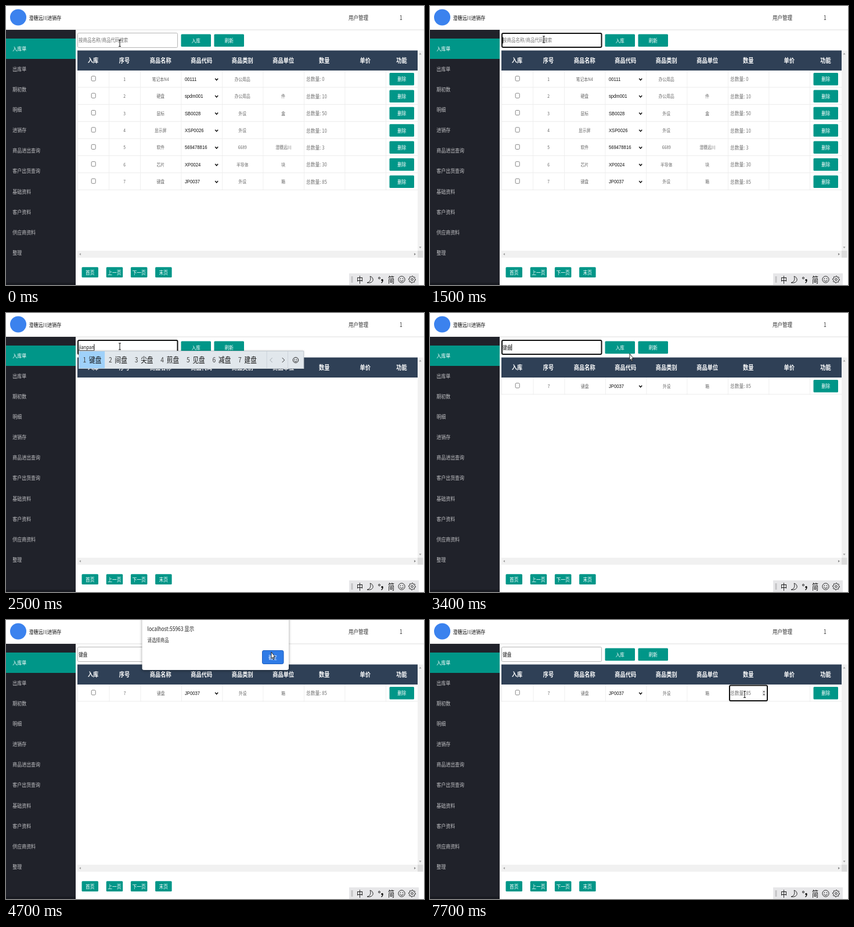
Recreate the animation shown at these times as an HTML page with a canvas. Size 720 by 480 pixels, loop 8 s.

```html
<!DOCTYPE html>
<html lang="zh-CN">
<head>
<meta charset="utf-8">
<title>入库单</title>
<style>
html, body { margin: 0; width: 100%; height: 100%; overflow: hidden; background: #fff; }
canvas { display: block; }
</style>
</head>
<body>
<canvas id="stage" width="720" height="480"></canvas>
<script>
const ctx = document.getElementById('stage').getContext('2d');
const LOOP = 8000, STEP = 100;
const ASPECT = 0.844;
const CJK = '"Noto Sans CJK SC", "Noto Sans CJK", sans-serif';
const ARIAL = '"Liberation Sans", sans-serif';
const TEAL = '#009688', NAVY = '#2f4056', GREY = '#757575';

const MENU = ['入库单', '出库单', '期初数', '明细', '进销存', '商品进出查询',
  '客户出货查询', '基础资料', '客户资料', '供应商资料', '整理'];
const EDGES = [123, 177, 231, 301.5, 372, 442.5, 513, 583.5, 654, 709];
const HEADS = ['入库', '序号', '商品名称', '商品代码', '商品类别', '商品单位', '数量', '单价', '功能'];
const ROWS = [
  ['笔记本N4', '00111', '办公用品', '', 0],
  ['硬盘', 'spdm001', '办公用品', '件', 10],
  ['鼠标', 'SB0028', '外设', '盒', 50],
  ['显示屏', 'XSP0026', '外设', '', 10],
  ['软件', '569478816', '6689', '澄穗远川', 3],
  ['芯片', 'XP0024', '半导体', '块', 30],
  ['键盘', 'JP0037', '外设', '箱', 85],
];
const ROW_H = 29.4;

// Typing in the input method: start time, letters, candidates, settings hint
const TYPING = [
  [1700, 'j', ['就', '几', '及', '家', '将', '叫', '进'], true],
  [1800, 'ji', ['几', '及', '级', '即', '记', '机', '集'], true],
  [2000, 'jian', ['减', '见', '间', '键', '', '吉安', '检'], true],
  [2100, 'jianp', ['键盘', '简谱', '减配', '肩膀', '尖皮', '建平', '检票'], true],
  [2200, 'jianpan', ['键盘', '间盘', '尖盘', '煎盘', '见盘', '减盘', '建盘'], false],
];
const COMMIT = 2700, BLUR = 3800, ALERT = 3900, CLOSE = 4900, QTY_FOCUS = 5600;

// Pointer path: time, x, y
const PATH = [
  [0, 196, 64], [300, 196, 64], [1200, 196, 57.5], [2900, 196, 57.5],
  [3400, 344, 70], [3800, 329, 60], [3900, 335, 58], [4200, 430, 70],
  [4300, 430, 70], [4500, 457, 55], [4800, 457, 55], [5500, 541, 128],
  [5900, 541, 128], [6000, 460, 127], [6400, 542, 128], [LOOP, 542, 128],
];

function rect(x, y, w, h, fill) {
  ctx.fillStyle = fill;
  ctx.fillRect(x, y, w, h);
}

function box(x, y, w, h, r, fill, stroke, width = 1) {
  ctx.beginPath();
  ctx.roundRect(x, y, w, h, r);
  if (fill) { ctx.fillStyle = fill; ctx.fill(); }
  if (stroke) { ctx.strokeStyle = stroke; ctx.lineWidth = width; ctx.stroke(); }
}

function line(points, color, width = 1) {
  ctx.beginPath();
  points.forEach(([x, y]) => ctx.lineTo(x, y));
  ctx.strokeStyle = color;
  ctx.lineWidth = width;
  ctx.stroke();
}

function shape(points, fill, stroke) {
  ctx.beginPath();
  points.forEach(([x, y]) => ctx.lineTo(x, y));
  ctx.closePath();
  ctx.fillStyle = fill;
  ctx.fill();
  if (stroke) { ctx.strokeStyle = stroke; ctx.lineWidth = 0.9; ctx.stroke(); }
}

function circle(x, y, r, fill, stroke) {
  ctx.beginPath();
  ctx.arc(x, y, r, 0, Math.PI * 2);
  if (fill) { ctx.fillStyle = fill; ctx.fill(); }
  if (stroke) { ctx.strokeStyle = stroke; ctx.lineWidth = 1; ctx.stroke(); }
}

// Draws one line of text centred vertically on y and returns its width.
function text(str, x, y, size, color, { align = 'left', weight = 400, font = CJK } = {}) {
  ctx.save();
  ctx.translate(x, y);
  ctx.scale(ASPECT, 1);
  ctx.font = `${weight} ${size}px ${font}`;
  ctx.textAlign = align;
  ctx.textBaseline = 'middle';
  ctx.fillStyle = color;
  ctx.fillText(str, 0, 0);
  const width = ctx.measureText(str).width * ASPECT;
  ctx.restore();
  return width;
}

const centred = (str, x, y, size, color, weight) =>
  text(str, x, y, size, color, { align: 'center', weight });

function button(label, x, y, w, h, size = 8.9, weight = 400) {
  box(x, y, w, h, 1.5, TEAL);
  centred(label, x + w / 2, y + h / 2 + 0.3, size, '#fff', weight);
}

function triangle(x, y, dx, dy, color, r = 2) {
  shape([[x + dx * r, y + dy * r], [x - dx + dy * r, y - dy + dx * r],
    [x - dx - dy * r, y - dy - dx * r]], color);
}

function smile(x, y, r) {
  circle(x, y, r, null, '#222');
  circle(x - r * 0.35, y - r * 0.25, 0.8, '#222');
  circle(x + r * 0.35, y - r * 0.25, 0.8, '#222');
  ctx.beginPath();
  ctx.arc(x, y, r * 0.55, 0.3, Math.PI - 0.3);
  ctx.stroke();
}

function drawFrame() {
  rect(0, 0, 720, 480, '#fff');
  rect(0, 40.5, 720, 1, '#dedede');
  circle(21, 19.5, 14, '#3b82ee');
  text('澄穗远川进销存', 39.5, 20.5, 9.44, '#111');
  text('用户管理', 590, 20, 10.1, '#333');
  text('1', 678, 20, 10.1, '#333');

  rect(0, 41, 120, 439, '#20222a');
  rect(0, 476, 120, 4, '#191b22');
  rect(0, 56, 120, 35, TEAL);
  MENU.forEach((name, i) =>
    text(name, 11.3, 73.3 + i * 35.1, 9.44, i ? '#c0c1c4' : '#fff'));

  button('入库', 301.5, 48.5, 51.5, 21.5);
  button('刷新', 358.5, 48.5, 51.5, 21.5);
  ['首页', '上一页', '下一页', '末页'].forEach((name, i) =>
    button(name, 130.5 + i * 42.2, 449.3, 28.5, 17.7, 9.2));

  rect(123, 76.5, 586, 34.5, NAVY);
  HEADS.forEach((name, i) =>
    centred(name, (EDGES[i] + EDGES[i + 1]) / 2, 94.3, 10.9, '#fff', 700));

  rect(709, 76.5, 9.5, 344.5, '#f1f1f1');
  rect(123, 421, 586, 12, '#f1f1f1');
  rect(709, 421, 9.5, 12, '#dcdcdc');
  triangle(713.5, 82.5, 0, -1, '#a3a3a3');
  triangle(713.5, 415, 0, 1, '#a3a3a3');
  triangle(128, 427, -1, 0, '#a3a3a3');
  triangle(704, 427, 1, 0, '#8a8a8a');
}

function drawRow(index, slot, shift) {
  const [name, code, kind, unit, count] = ROWS[index];
  const top = 111 + slot * ROW_H, y = top + 14.7;
  const mid = i => (EDGES[i] + EDGES[i + 1]) / 2 + (i < 5 ? shift : 0);
  rect(123, top + ROW_H - 1, 586, 1, '#ececec');
  EDGES.slice(0, -1).forEach((x, i) =>
    rect(x + (i && i < 5 ? shift : 0), top, 0.8, ROW_H, '#ececec'));
  box(147.2, y - 5, 7, 8.2, 1.6, '#fff', '#767676', 0.9);
  centred(String(index + 1), mid(1), y, 8, '#666');
  centred(name, mid(2), y, 8, '#666');
  text(code, 308, y + 0.6, 9.1, '#111', { font: ARIAL });
  line([[360.2, y - 1], [362.7, y + 1.8], [365.2, y - 1]], '#111', 1.5);
  centred(kind, mid(4), y, 8, '#666');
  centred(unit, mid(5), y, 8, '#666');
  text('总数量: ' + count, 517, y + 0.3, 9.2, GREY);
  button('删除', 660.5, top + 4, 42.5, 21.5, 8.9, 500);
}

function drawSearch(t, typed) {
  const focused = t >= 1400 && t < BLUR;
  if (focused) box(124, 47, 171.5, 24, 2, '#fff', '#111', 2);
  else box(123.5, 46.5, 172, 25, 2, '#fff', '#b4b4b4');
  let width = 0;
  if (typed) {
    width = text(typed[1], 125.5, 59, 8.9, '#111');
    rect(125.5, 64, width, 0.8, '#333');
  } else if (t >= COMMIT) {
    width = text('键盘', 125.3, 59.5, 8.9, '#111');
  } else {
    text('按商品名称/商品代码搜索', 125, 59, 8.9, GREY);
  }
  const blinkOn = t < COMMIT || Math.floor((t - COMMIT) / 500) % 2 === 1;
  if (focused && blinkOn) rect(125.2 + width, 53.5, 1, 11, '#111');
}

function drawCandidates([, , words, hint]) {
  const sizeOf = word => (word.length > 1 ? 44.6 : 34.5);
  const total = words.reduce((sum, word) => sum + sizeOf(word), 0);
  const left = 125, end = left + total + 11.5, width = end + 64.5 - left;
  const height = hint ? 54 : 31;
  ctx.save();
  ctx.shadowColor = 'rgba(0,0,0,.25)';
  ctx.shadowBlur = 3;
  rect(left, 65, width, height, '#e1e7ec');
  ctx.restore();
  rect(left, 65, sizeOf(words[0]) + 0.5, 31, '#9fd1fa');
  let x = left + 7.5;
  words.forEach((word, i) => {
    text(String(i + 1), x, 80.5, 12.2, '#444');
    if (word) text(word, x + 10.5, 80.5, 12.6, '#111');
    else {
      line([[x + 12, 75], [x + 20, 85]], '#111', 3);
      line([[x + 11, 80], [x + 15, 76.5]], '#333', 1);
      line([[x + 19, 86.5], [x + 22, 83]], '#333', 1);
    }
    x += sizeOf(word);
  });
  rect(end, 65, 0.8, 31, '#c8d0d6');
  rect(end + 36.5, 65, 0.8, 31, '#c8d0d6');
  line([[end + 10, 77], [end + 6, 81], [end + 10, 85]], '#a2aab0');
  line([[end + 27, 77], [end + 31, 81], [end + 27, 85]], '#333');
  smile(end + 50.3, 81, 4.7);
  if (hint) {
    rect(left, 96, width, 1, '#cdd4da');
    text('点击前往设置页面开启模糊音<an,ang>。', 132, 108, 8.4, '#0a6cd0');
    text('不再提示', left + width - 7, 108, 8.3, '#0a6cd0', { align: 'right' });
  }
  box(left + 0.5, 65.5, width - 1, height - 1, 0, null, '#c3cbd1');
}

function drawAlert(t) {
  ctx.save();
  ctx.shadowColor = 'rgba(0,0,0,.4)';
  ctx.shadowBlur = 5;
  ctx.shadowOffsetY = 1;
  box(234.5, -5, 252.5, 91, 3, '#fff');
  ctx.restore();
  text('localhost:55963 显示', 243.5, 15.3, 10, '#222');
  text('请选择商品', 243.5, 34.5, 8.8, '#333');
  const hover = t >= 4700;
  box(441.5, 52.5, 36.5, 23, 2.5, hover ? '#2f7be6' : '#1a73e8', hover ? '#1d5fc0' : '#5b9bf0');
  centred('确定', 459.5, 64.5, 8.6, '#fff');
}

function drawQuantity(t) {
  box(516, 112.5, 65, 26.5, 2, '#fff', '#111', 2);
  text('总数量: 85', 517, 126, 9.2, GREY);
  rect(572, 120.5, 6.5, 10.5, '#ececec');
  triangle(575.2, 123.3, 0, -1, '#444', 1.6);
  triangle(575.2, 128.3, 0, 1, '#444', 1.6);
  if (Math.floor((t - QTY_FOCUS + 400) / 500) % 2 === 0 || t < 6200)
    rect(517, 120, 1, 11, '#222');
}

function drawInputBar() {
  rect(591, 460, 120, 20, '#e7e7e9');
  rect(594.5, 465, 3, 11, '#c4c4c6');
  centred('中', 609.5, 471, 13.2, '#111');
  ctx.beginPath();
  ctx.moveTo(627, 465);
  ctx.bezierCurveTo(635, 467, 634, 478, 622, 476);
  ctx.bezierCurveTo(628, 475, 629, 469, 627, 465);
  ctx.strokeStyle = '#222';
  ctx.lineWidth = 1;
  ctx.stroke();
  circle(643, 468, 1.5, null, '#222');
  circle(648, 471.5, 1.7, '#111');
  line([[649, 472], [648.5, 474.5], [646.5, 476.5]], '#111', 1.3);
  centred('简', 663.5, 471, 13.2, '#111');
  smile(681.5, 470.5, 5.6);
  circle(699.5, 470.5, 1.8, null, '#222');
  const teeth = Array.from({ length: 33 }, (_, i) => {
    const a = i * Math.PI / 16, r = i % 4 < 2 ? 6 : 4.6;
    return [699.5 + r * Math.cos(a), 470.5 + r * Math.sin(a)];
  });
  line(teeth, '#222');
}

function pointerAt(t) {
  const next = Math.max(1, PATH.findIndex(key => key[0] > t));
  const [t0, x0, y0] = PATH[next - 1], [t1, x1, y1] = PATH[next];
  const p = (t - t0) / (t1 - t0), e = p * p * (3 - 2 * p);
  return [x0 + (x1 - x0) * e, y0 + (y1 - y0) * e];
}

function drawPointer(t) {
  const [x, y] = pointerAt(t);
  const within = (l, top, r, b) => x > l && x < r && y > top && y < b;
  const alert = t >= ALERT && t < CLOSE;
  const put = points => points.map(([dx, dy]) => [x + dx, y + dy]);
  if (!alert && (within(123, 46, 296, 72) || within(515, 112, 582, 140))) {
    line(put([[0, -5.5], [0, 5.5]]), '#111');
    line(put([[-2, -5.5], [2, -5.5]]), '#111');
    line(put([[-2, 5.5], [2, 5.5]]), '#111');
  } else if (!alert && within(301, 48, 410, 70)) {
    shape(put([[-1, 0], [1, 0], [1, 4], [5, 5.5], [5, 10], [3.5, 13], [-1.5, 13],
      [-4, 8], [-3, 7], [-1, 9]]), '#fff', '#111');
  } else {
    shape(put([[0, 0], [0, 11.5], [2, 9.3], [3.6, 13], [5, 12.2], [3.6, 8.6], [6.4, 8.4]]),
      '#fff', '#111');
  }
}

function draw(t) {
  const typed = t < COMMIT ? TYPING.filter(step => step[0] <= t).pop() : null;
  drawFrame();
  if (t < 1700) ROWS.forEach((_, i) => drawRow(i, i, 0));
  else if (t >= 2800) drawRow(6, 0, 0.6);
  drawSearch(t, typed);
  if (typed) drawCandidates(typed);
  if (t >= ALERT && t < CLOSE) drawAlert(t);
  if (t >= QTY_FOCUS) drawQuantity(t);
  drawInputBar();
  drawPointer(t);
}

const start = performance.now();
function tick() {
  const t = (performance.now() - start) % LOOP;
  draw(Math.floor(t / STEP) * STEP);
  requestAnimationFrame(tick);
}
tick();
</script>
</body>
</html>
```
